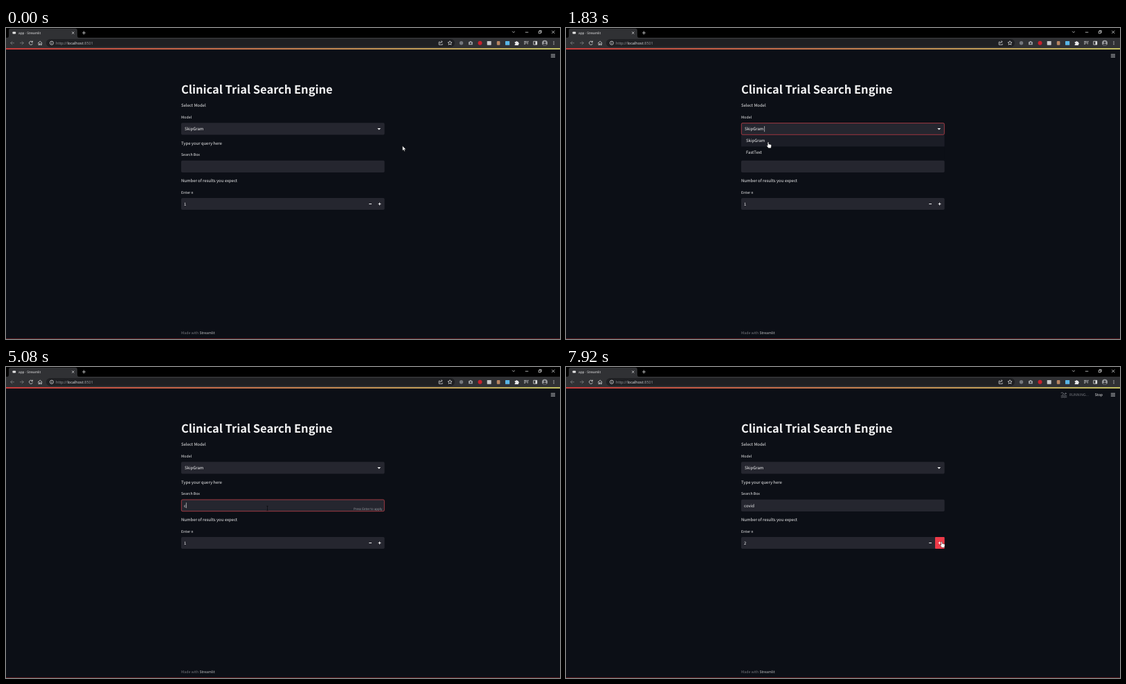
An HTML page for the animation above (8 s loop, 800x450 px).

```html
<!DOCTYPE html>
<html lang="en">
<head>
<meta charset="utf-8">
<title>Clinical Trial Search Engine</title>
<style>
  html, body { margin: 0; width: 100%; height: 100%; overflow: hidden; background: #0c0f16; }
  svg { display: block; width: 100vw; height: 100vh; }
  text { font-family: "Noto Sans CJK JP", "Noto Sans CJK SC", "Open Sans", sans-serif;
         font-size: 5.98px; fill: #f4f4f5; text-rendering: geometricPrecision; white-space: pre; }
  .label, .small { font-size: 5.23px; }
  .hint { font-size: 4.48px; fill: #a0a1a7; }
  .title { font-size: 16.45px; font-weight: 700; }
  .dim { fill: #77797f; }
  .chrome { font-family: "Open Sans", "Noto Sans", sans-serif; }
  .field { fill: #25262f; }
  .focus { fill: none; stroke: #c9414a; stroke-width: .75; }
  .line { fill: none; stroke: #dfe0e2; stroke-width: .75; }
  .off { opacity: .45; }
  .caret { stroke: #f4f4f5; stroke-width: .6; }
  .sport { fill: none; stroke: #85878d; stroke-width: .7; stroke-linecap: round; }
</style>
</head>
<body>
<svg viewBox="0 0 800 450" preserveAspectRatio="none">
  <defs>
    <linearGradient id="bar">
      <stop offset="0" stop-color="#d8403f"/><stop offset="1" stop-color="#d3cf69"/>
    </linearGradient>
  </defs>
  <rect width="800" height="450" fill="#0c0f16"/>

  <!-- browser -->
  <rect width="800" height="15" fill="#000"/>
  <path d="M1 14.2Q4 14.2 4 11V4Q4 .8 7 .8H100Q103 .8 103 4V11Q103 14.2 106 14.2Z" fill="#303134"/>
  <rect y="14" width="800" height="15.3" fill="#303134"/>
  <rect x="58" y="16" width="590" height="11.4" rx="5.7" fill="#1f2023"/>
  <rect x="9.5" y="5.6" width="4.6" height="2.8" rx=".6" fill="#e6e6e6"/>
  <text class="chrome" x="18" y="9" style="font-size:4.75px">app · Streamlit</text>
  <text class="chrome dim" x="72" y="23.8" style="font-size:5.58px;fill:#989a9e">http://<tspan fill="#e4e5e7">localhost</tspan>:8501</text>
  <g class="line">
    <path d="M95.2 5.5l3.2 3.2m0-3.2l-3.2 3.2M110 7h5M112.500 4.500v5"/>
    <path d="M731 4.800l1.900 1.900 1.900-1.900M749.800 6.200h4.500M788.200 3.800l4.200 4.200m0-4.200l-4.200 4.200"/>
    <path d="M769.200 4.800h3v3h-3zM770.200 4.600v-.9h3v3h-.8"/>
    <path class="off" d="M12 21.700H6.700m2.500-2.500l-2.500 2.500 2.500 2.500M20 21.700h5.300m-2.500-2.500l2.500 2.500-2.500 2.500"/>
    <path d="M38 20a2.600 2.600 0 1 0 .5 2.500M38.400 18.600v2h-2"/>
    <path d="M46.200 21.800l3-2.700 3 2.700M47 21.400v3.100h1.500v-1.800h1.400v1.800h1.500v-3.100"/>
    <circle cx="66" cy="21.700" r="2.600"/><path d="M66 21.300v1.800M66 19.900v.6"/>
    <path d="M627 20.200h-1.800v4h5v-1.500M626.800 22.500q.3-2.500 3-2.700m-1.200-1.300l1.500 1.300-1.500 1.400"/>
    <path d="M641 18.700l.9 1.900 2.100.2-1.600 1.400.5 2.100-1.900-1.100-1.900 1.100.5-2.100-1.600-1.400 2.100-.2z"/>
    <path d="M748 19.500h4M748 21.400h4M748 23.200h2.200M753.200 23.600v-4.200h1.300"/>
    <path d="M761.700 19.300h5v4.800h-5z"/>
  </g>
  <circle cx="657.500" cy="21.800" r="2.700" fill="#74777c"/>
  <path d="M668 20h1.400l.5-1h2l.5 1h1.400v4.300H668z" fill="#a2a4a8"/><circle cx="670.900" cy="22" r="1.300" fill="#404145"/>
  <circle cx="684.500" cy="21.800" r="3" fill="#c8202b"/>
  <rect x="694.700" y="18.900" width="6" height="5.800" rx=".6" fill="#c8c9cb"/>
  <rect x="708.800" y="19" width="4.600" height="5.800" rx="1" fill="#b98562"/>
  <rect x="721" y="18.900" width="6.200" height="5.800" rx=".5" fill="#58b5e6"/>
  <path d="M734.700 20h1.700a1 1 0 0 1 2 0h1.500v1.600a1 1 0 0 1 0 2v1.500h-5.200v-1.700a.9.9 0 0 0 0-1.800z" fill="#e8e8e9"/>
  <rect x="764.500" y="19.300" width="2.400" height="4.800" fill="#dfe0e2"/>
  <circle cx="778" cy="21.700" r="4" fill="#9b9da0"/>
  <path d="M775.200 24.500q.3-2 2.800-2t2.800 2q-2.800 2.400-5.600 0z" fill="#3b3c40"/><circle cx="778" cy="20.700" r="1.500" fill="#3b3c40"/>
  <g fill="#dfe0e2"><circle cx="791" cy="19.700" r=".6"/><circle cx="791" cy="21.700" r=".6"/><circle cx="791" cy="23.700" r=".6"/></g>

  <!-- page -->
  <rect y="29.200" width="800" height="1.900" fill="url(#bar)"/>
  <rect y="449.200" width="800" height=".8" fill="#6a1c20"/>
  <path class="line" d="M786.800 38.200h6.200M786.800 40.200h6.200M786.800 42.200h6.200"/>
  <text class="title" x="253" y="95.300">Clinical Trial Search Engine</text>
  <text x="253" y="114.300">Select Model</text>
  <text class="label" x="253" y="131">Model</text>
  <rect class="field" x="253" y="137.300" width="293.600" height="17.200" rx="1.700"/>
  <text x="258" y="148.300">SkipGram</text>
  <path d="M536.300 145h4.800l-2.400 2.600z" fill="#f4f4f5"/>
  <text x="253" y="168.700">Type your query here</text>
  <text class="label" x="253" y="185.200">Search Box</text>
  <rect class="field" x="253" y="191.700" width="293.600" height="17.200" rx="1.700"/>
  <text id="query" x="257" y="202.500"></text>
  <text id="hint" class="hint" x="502" y="206.700">Press Enter to apply</text>
  <text x="253" y="222.800">Number of results you expect</text>
  <text class="label" x="253" y="239.700">Enter n</text>
  <rect class="field" x="253" y="246" width="293.600" height="17" rx="1.700"/>
  <rect id="plusHover" x="533" y="246" width="13.600" height="17" rx="1" fill="#ee3a48"/>
  <text id="count" x="257" y="257">1</text>
  <path d="M524.200 254.600h3.800M537.600 254.600h3.800M539.500 252.700v3.800" stroke="#f4f4f5" stroke-width="1"/>
  <text class="small dim" x="253" y="443.200">Made with <tspan fill="#c3c4c7">Streamlit</tspan></text>

  <g id="menu">
    <rect x="253" y="154.700" width="293.600" height="33.400" fill="#0c0f16"/>
    <rect id="row" x="253" width="293.600" height="16.800" fill="#1b1d26"/>
    <text x="260" y="165">SkipGram</text>
    <text x="260" y="181.800">FastText</text>
  </g>
  <rect id="modelFocus" class="focus" x="253.300" y="137.600" width="293" height="16.700" rx="1.700"/>
  <path id="modelCaret" class="caret" d="M286.600 142v8.200"/>
  <rect id="queryFocus" class="focus" x="253.300" y="192" width="293" height="16.700" rx="1.700"/>
  <path id="queryCaret" class="caret" d="M0 196.200v8"/>

  <g id="running">
    <g id="swim" class="sport">
      <path d="M715 41.800q1 .8 2 0t2 0 2 0 2 0M715 43.800q1 .8 2 0t2 0 2 0 2 0M716.500 40.300l2.300-1.600-1.700-1.700-2 .4M719 38.800l1.800 1.500"/>
      <circle cx="721.500" cy="38.300" r=".7"/>
    </g>
    <g id="wheel" class="sport">
      <circle cx="718.700" cy="42" r="2.300"/><circle cx="720.700" cy="36.900" r=".7"/>
      <path d="M720 38.400l-1.300 2.500h2.700l1.300 3M719.800 38.700l-2.400-.2-1 1.500"/>
    </g>
    <text class="small dim" x="727" y="42.100">RUNNING...</text>
    <text class="small" x="763.800" y="42.100">Stop</text>
  </g>

  <g id="cursor">
    <path id="arrow" d="M0 0V7.100L1.600 5.600 2.700 8 3.800 7.500 2.800 5.200H5z" fill="#fff" stroke="#000" stroke-width=".4"/>
    <path id="hand" d="M-.8.600Q0-.500.800.600V3L3.900 3.700Q4.700 4 4.600 5L4 8.800H.300L-2.300 5.600Q-2.200 4.500-.8 5.300Z" fill="#fff" stroke="#000" stroke-width=".4"/>
    <path id="beam" d="M-1.200-3.200H1.200M0-3.200V3.200M-1.200 3.200H1.200" fill="none" stroke="#050608" stroke-width=".6"/>
  </g>
</svg>
<script>
const LOOP = 8000;
const el = id => document.getElementById(id);

// pointer path: time, x, y
const path = [
  [0, 572.5, 170.5], [410, 572.5, 170.5], [500, 420, 158], [580, 306, 147], [750, 297, 150],
  [990, 297, 150], [1080, 296, 159], [1400, 296, 159], [1420, 294, 176], [1580, 294, 177],
  [1750, 293, 169], [1830, 292, 165], [2000, 292, 163], [2330, 292, 163], [2670, 295, 172],
  [2830, 304, 179], [3000, 324, 186], [3080, 335.8, 190.5], [3250, 362, 200], [3420, 377.500, 204.500],
  [6730, 377.500, 204.500], [6830, 450, 238], [7240, 450, 238], [7250, 546.500, 252.500],
  [7420, 544, 252.500], [7580, 542.500, 252.500]
];
const shape = [[0, 'arrow'], [500, 'hand'], [2330, 'arrow'], [3160, 'beam'], [6800, 'arrow'], [7250, 'hand']];
const typed = [[0, ''], [5080, 'c'], [5170, 'co'], [5500, 'cov'], [5670, 'covi'], [6170, 'covid']];

// spans of time in which a part is visible
const spans = {
  menu: [[580, 2330]],
  modelFocus: [[580, 3580]],
  modelCaret: [[580, 1000], [1500, 2000]],
  queryFocus: [[3580, 7420]],
  queryCaret: [[3580, 4080], [4580, 6750], [7250, 7420]],
  hint: [[5080, 7420]],
  plusHover: [[7250, LOOP]],
  running: [[2670, 3900], [7670, LOOP]],
  swim: [[2670, 3330], [7670, LOOP]],
  wheel: [[3330, 3900]]
};

const show = (id, on) => { el(id).style.display = on ? '' : 'none'; };
const step = (table, t) => table.reduce((v, [at, next]) => t >= at ? next : v, table[0][1]);

function pointer(t) {
  const i = path.findIndex(p => p[0] > t);
  if (i < 0) return path[path.length - 1].slice(1);
  const [t0, x0, y0] = path[i - 1], [t1, x1, y1] = path[i];
  const k = (t - t0) / (t1 - t0);
  return [x0 + (x1 - x0) * k, y0 + (y1 - y0) * k];
}

function draw(t) {
  for (const id in spans) show(id, spans[id].some(([a, b]) => t >= a && t < b));
  const text = step(typed, t), query = el('query');
  if (query.textContent !== text) query.textContent = text;
  const width = text ? query.getComputedTextLength() : 0;
  el('queryCaret').setAttribute('transform', `translate(${257.300 + width} 0)`);
  el('count').textContent = t < 7580 ? '1' : '2';
  el('row').setAttribute('y', t >= 1420 && t < 1750 ? 171.300 : 154.700);
  const kind = step(shape, t);
  for (const id of ['arrow', 'hand', 'beam']) show(id, id === kind);
  el('cursor').setAttribute('transform', `translate(${pointer(t).join(' ')})`);
}

const start = performance.now();
function tick() {
  draw((performance.now() - start) % LOOP);
  requestAnimationFrame(tick);
}
tick();
</script>
</body>
</html>
```
